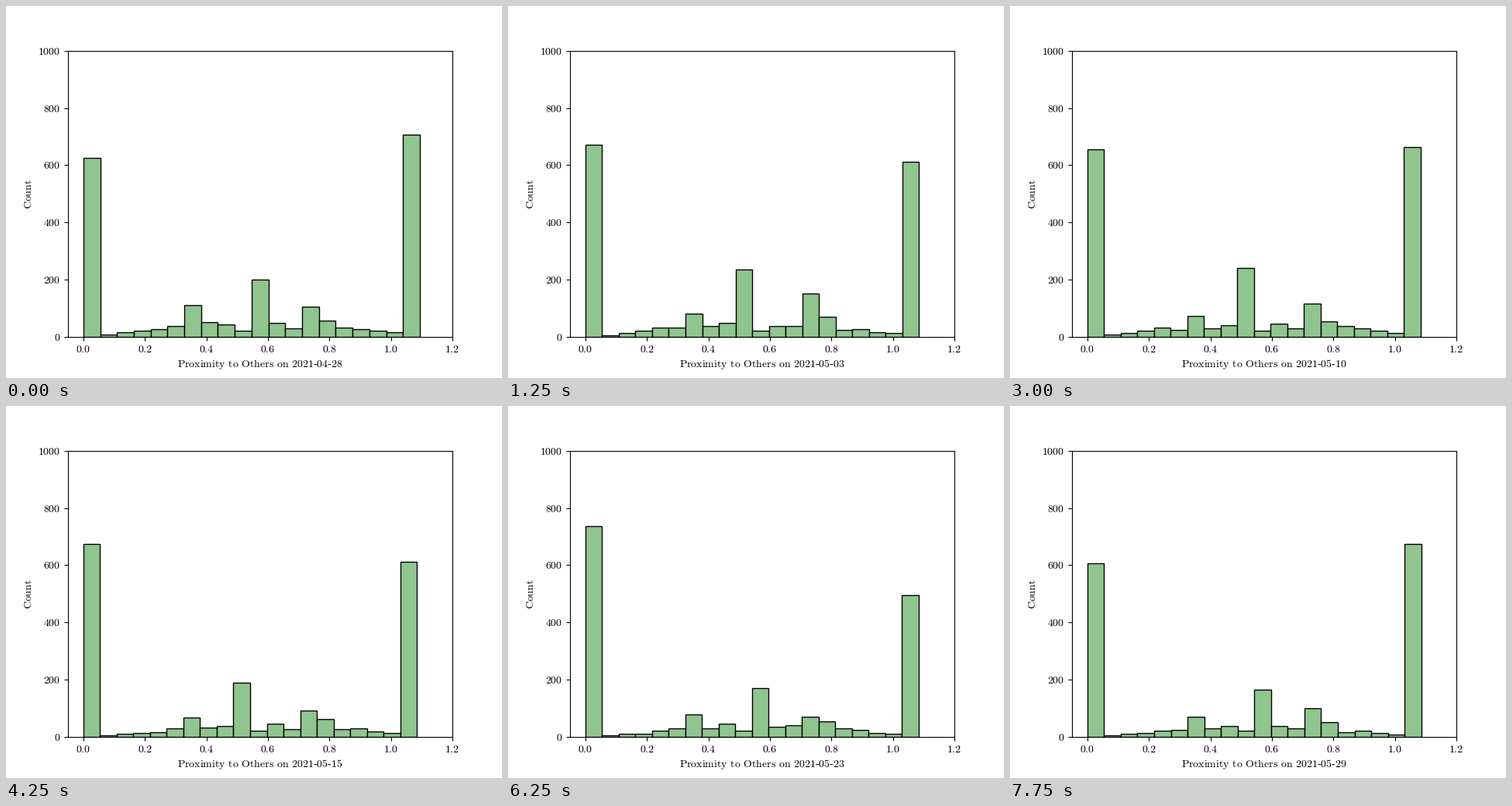
A matplotlib script that plays this animation: 640x480 px, repeating every 8 s.

```python
import numpy as np
import matplotlib.pyplot as plt
from matplotlib.animation import FuncAnimation

FRAMES, STEP_MS, BINS = 32, 250, 20
START = np.datetime64("2021-04-28")
FILL = "#90c590"

# Key points of the parts that stand out, followed linearly from day to day
KEY_DAYS = [0, 3, 8, 12, 17, 25, 31]
RIGHT_END = [1.094, 1.0854, 1.0845, 1.0835, 1.0845, 1.0835, 1.0859]
FIRST = [625, 690, 645, 655, 675, 737, 607]
LAST = [707, 563, 685, 663, 612, 496, 675]
CENTRE = [200, 225, 249, 241, 189, 171, 165]
SHOULDER = [106, 157, 143, 116, 92, 70, 100]

plt.rcParams.update({"font.family": "Liberation Serif", "mathtext.fontset": "cm"})


def at(day, track):
    return np.interp(day, KEY_DAYS, track)


def day_counts(day):
    # Low arch with two bumps, fading over the month with daily scatter
    counts = 42 * np.sin(np.pi * np.arange(BINS) / BINS)
    counts[[6, 14]] = 78, 60
    scatter = np.random.default_rng(day).normal(1, 0.15, BINS)
    counts *= (1.2 - 0.4 * day / (FRAMES - 1)) * scatter

    # The central peak sits in one of two neighbouring bins
    peak, twin = (9, 10) if 2 <= day <= 21 else (10, 9)
    counts[twin] = 21
    counts[peak] = at(day, CENTRE)
    counts[13] = at(day, SHOULDER)
    counts[0] = at(day, FIRST)
    counts[-1] = at(day, LAST)
    return counts


def roman(text):
    # This space is one third of an em in the upright font
    return r"$\mathrm{" + text.replace(" ", r"\hspace{0.38}") + "}$"


def date_label(day):
    year, month, date = str(START + day).split("-")
    first = roman(f"Proximity to Others on {year}")
    return "-".join([first, roman(month), roman(date)])


fig, ax = plt.subplots(figsize=(6.4, 4.8), dpi=100)
ax.set(xlim=(-0.05, 1.2), ylim=(0, 1000))
xticks = np.arange(7) * 0.2
yticks = np.arange(0, 1001, 200)
ax.set_xticks(xticks, [roman(f"{x:.1f}") for x in xticks])
ax.set_yticks(yticks, [roman(str(y)) for y in yticks])
ax.set_ylabel(roman("Count"))
bars = ax.bar(np.arange(BINS), np.zeros(BINS), align="edge",
              facecolor=FILL, edgecolor="black", linewidth=1)


def draw(day):
    width = at(day, RIGHT_END) / BINS
    for i, (bar, count) in enumerate(zip(bars, day_counts(day))):
        bar.set_bounds(i * width, 0, width, count)
    ax.set_xlabel(date_label(day), labelpad=3.1)
    return bars


anim = FuncAnimation(fig, draw, frames=FRAMES, interval=STEP_MS,
                     repeat=True, repeat_delay=0)
plt.show()
```
